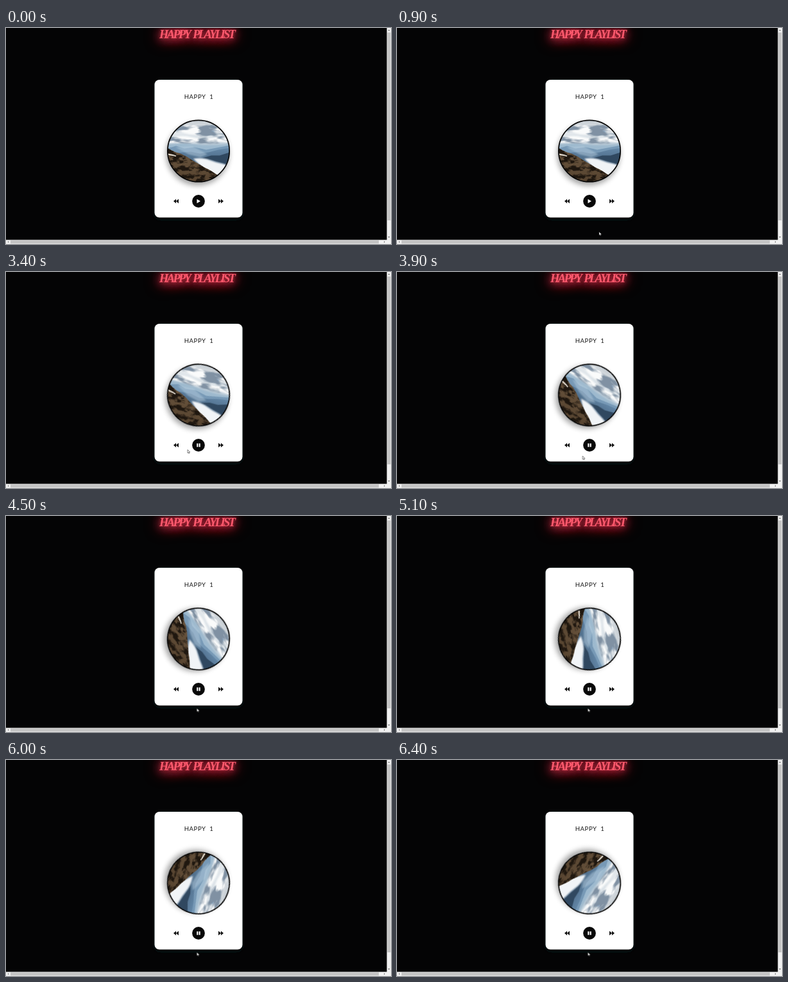
These frames come from a looping animation (600x338 px, 6500 ms). An HTML page:

```html
<!DOCTYPE html>
<html lang="en">
<head>
<meta charset="utf-8">
<title>Happy playlist</title>
<style>
  :root { --loop: 6500ms linear infinite; }
  html, body { margin: 0; width: 100%; height: 100%; overflow: hidden; background: #040405; }
  .stage { position: relative; width: 600px; height: 338px; overflow: hidden; }
  svg { position: absolute; inset: 0; }
  h1 {
    position: absolute; left: 239px; top: -1px; margin: 0;
    font: italic bold 18.5px/22px "Liberation Serif", "Times New Roman", serif;
    letter-spacing: -2.65px; word-spacing: 3.5px; white-space: nowrap; color: #ff5a6e;
    text-shadow: 0 0 5px #b52a3e, 0 2px 14px #d23c50, 0 2px 20px #d23c50, 0 2px 26px #d23c50;
  }
  .song { font: 9.6px Lato, sans-serif; letter-spacing: .55px; word-spacing: 3px; fill: #161616; }

  .disc { transform-origin: 300px 192.5px; animation: spin var(--loop); }
  .thumb { fill: #c4c4c4; animation: thumb var(--loop); }
  .glyph { fill: #fff; animation: hover var(--loop); }
  .play { animation: play var(--loop); }
  .pause { animation: pause var(--loop); }
  .cursor { animation: move var(--loop); }
  .arrow { animation: arrow var(--loop); }
  .hand { animation: hand var(--loop); }

  @keyframes spin {
    0% { transform: rotate(0deg); animation-timing-function: step-end; }
    46.154% { transform: rotate(1deg); animation-timing-function: steps(35); }
    100% { transform: rotate(126deg); }
  }
  @keyframes thumb {
    0%, 12.3% { fill: #c4c4c4; }
    12.308%, 13.84% { fill: #a8a8a8; }
    13.846%, 100% { fill: #c4c4c4; }
  }
  @keyframes hover {
    0%, 23.07% { fill: #fff; }
    23.077%, 46.15% { fill: #f8485e; }
    46.154%, 100% { fill: #fff; }
  }
  @keyframes play {
    0%, 35.38% { opacity: 1; }
    35.385%, 100% { opacity: 0; }
  }
  @keyframes pause {
    0%, 35.38% { opacity: 0; }
    35.385%, 100% { opacity: 1; }
  }
  @keyframes move {
    0%, 10.769% { transform: translate(319px, 336px); animation-timing-function: steps(2); }
    13.846% { transform: translate(315px, 319px); animation-timing-function: steps(6); }
    23.077%, 44.615% { transform: translate(299px, 275.5px); animation-timing-function: steps(5); }
    52.308%, 55.385% { transform: translate(283px, 278px); animation-timing-function: steps(7); }
    66.154%, 100% { transform: translate(297.5px, 301px); }
  }
  @keyframes arrow {
    0%, 10.76% { opacity: 0; }
    10.769%, 23.07% { opacity: 1; }
    23.077%, 46.15% { opacity: 0; }
    46.154%, 100% { opacity: 1; }
  }
  @keyframes hand {
    0%, 23.07% { opacity: 0; }
    23.077%, 46.15% { opacity: 1; }
    46.154%, 100% { opacity: 0; }
  }
</style>
</head>
<body>
<div class="stage">
  <svg width="600" height="338" viewBox="0 0 600 338">
    <defs>
      <linearGradient id="sky" x1="0" y1="0" x2="0" y2="1">
        <stop offset="0" stop-color="#c3cad0"/>
        <stop offset=".2" stop-color="#e6eaed"/>
        <stop offset=".34" stop-color="#cfdae2"/>
        <stop offset=".5" stop-color="#86a5bd"/>
      </linearGradient>
      <linearGradient id="ridge" x1="0" y1="0" x2="0" y2="1">
        <stop offset="0" stop-color="#6488a8"/>
        <stop offset="1" stop-color="#3a526c"/>
      </linearGradient>
      <linearGradient id="hill" x1="0" y1="0" x2="0" y2="1">
        <stop offset="0" stop-color="#6b563f"/>
        <stop offset="1" stop-color="#56432f"/>
      </linearGradient>
      <clipPath id="round"><circle r="48"/></clipPath>
      <filter id="soft" x="-30%" y="-30%" width="160%" height="160%"><feGaussianBlur stdDeviation="1"/></filter>
      <filter id="shade" x="-30%" y="-30%" width="160%" height="160%"><feGaussianBlur stdDeviation="4"/></filter>
      <!-- Patchy cover, cut to the shape it is applied to -->
      <filter id="clouds" x="0" y="0" width="1" height="1" color-interpolation-filters="sRGB">
        <feTurbulence type="fractalNoise" baseFrequency=".035 .1" numOctaves="3" seed="4"/>
        <feColorMatrix values="0 0 0 0 .5  0 0 0 0 .57  0 0 0 0 .64  5 0 0 0 -2.4"/>
        <feComposite in2="SourceGraphic" operator="in"/>
      </filter>
      <filter id="scrub" x="0" y="0" width="1" height="1" color-interpolation-filters="sRGB">
        <feTurbulence type="fractalNoise" baseFrequency=".1 .16" numOctaves="3" seed="7"/>
        <feColorMatrix values="0 0 0 0 .12  0 0 0 0 .09  0 0 0 0 .06  5 0 0 0 -2.1"/>
        <feComposite in2="SourceGraphic" operator="in"/>
      </filter>
      <path id="slope" d="M-49-5-42-1-35 2-28 4-18 9-9 15 0 20 8 25 18 30 27 36 40 43V49H-49z"/>
      <path id="skip" d="M0-3.4 4.1 0 0 3.4zM3.9-3.4 8 0 3.9 3.4z"/>
    </defs>

    <rect x="231.5" y="83" width="137" height="216" rx="8" fill="#0a1213" filter="url(#shade)"/>
    <rect x="231.5" y="81" width="137" height="215.5" rx="7.5" fill="#fff"/>
    <text class="song" x="277.7" y="111">HAPPY 1</text>

    <g class="disc">
      <circle cx="298.5" cy="197.5" r="49" opacity=".36" filter="url(#shade)"/>
      <g transform="translate(300 192.5)">
        <g clip-path="url(#round)">
          <rect x="-49" y="-49" width="98" height="98" fill="url(#sky)"/>
          <g filter="url(#soft)">
            <path fill="#fafbfb" d="M-34-34Q-16-44 0-39T26-42L38-32Q20-35 8-29T-22-28zM-47-19Q-30-26-12-22T24-21T49-18V-13Q26-16 8-14T-47-13z"/>
            <path fill="#6fa3cd" d="M10-30Q18-34 25-31L22-27Q15-25 10-27z"/>
          </g>
          <rect x="-49" y="-49" width="98" height="38" filter="url(#clouds)"/>
          <path fill="#9db9ce" filter="url(#soft)" d="M-49-10Q-26-13-4-10T49-11V5H-49z"/>
          <path fill="#7799b6" d="M-49-4-35-8-22-4-6-6 12-2 28-5 49-9V22H-49z"/>
          <path fill="url(#ridge)" d="M-34 3-12 1 2 4 16 2 31-2 49-5V32H10z"/>
          <path fill="#304860" d="M6 11 20 7 33 7 49 2V22L34 18 20 14z"/>
          <path fill="#b3cadb" opacity=".5" filter="url(#soft)" d="M-36-6-10-8 14 5 3 10-16 5z"/>
          <path fill="#f1f4f7" filter="url(#soft)" d="M-8 12Q7 10 17 14T38 20L50 24V50H38L14 34z"/>
          <use href="#slope" fill="url(#hill)"/>
          <use href="#slope" filter="url(#scrub)"/>
          <path fill="none" stroke="#e2dcd2" stroke-width="1.8" d="M-48 5-40 6.5-35 8"/>
        </g>
        <circle r="48.2" fill="none" stroke="#050505" stroke-width="1.7"/>
      </g>
    </g>

    <g fill="#111">
      <use href="#skip" transform="translate(269 271) scale(-1 1)"/>
      <use href="#skip" transform="translate(331 271)"/>
      <circle cx="300" cy="271" r="9.9" fill="#080808"/>
    </g>
    <g class="glyph">
      <path class="play" d="M297.5 267.8 303 271 297.5 274.2z"/>
      <path class="pause" d="M297.3 268.3h2.1v5.4h-2.1zM300.6 268.3h2.1v5.4h-2.1z"/>
    </g>
  </svg>

  <h1>HAPPY PLAYLIST</h1>

  <svg width="600" height="338" viewBox="0 0 600 338">
    <path fill="#f1f1f1" d="M593.5 0H600V338H0V331.5H593.5z"/>
    <rect x="594.3" y="7" width="5" height="294" fill="#c4c4c4"/>
    <rect class="thumb" x="7" y="332.3" width="574" height="5"/>
    <path fill="#555" d="M595.3 4.2 596.8 2.5 598.3 4.2zM595.3 326.5H598.3L596.8 328.2z"/>
    <path fill="#777" d="M4.2 333.3V336.3L2.5 334.8zM589 333.3V336.3L590.7 334.8z"/>
    <g class="cursor" stroke="#333" stroke-width=".6" stroke-linejoin="round" fill="#fff">
      <path class="arrow" d="M0 0V5.3L1.2 4.2 2 6 2.9 5.6 2.1 3.9H3.8z"/>
      <path class="hand" d="M-.6.6Q0-.2.7.6V3L3.3 3.6Q4.2 4 3.9 5.2L3.2 8H-.2L-2.1 5.3Q-2.2 4.3-.6 5z"/>
    </g>
  </svg>
</div>
</body>
</html>
```
